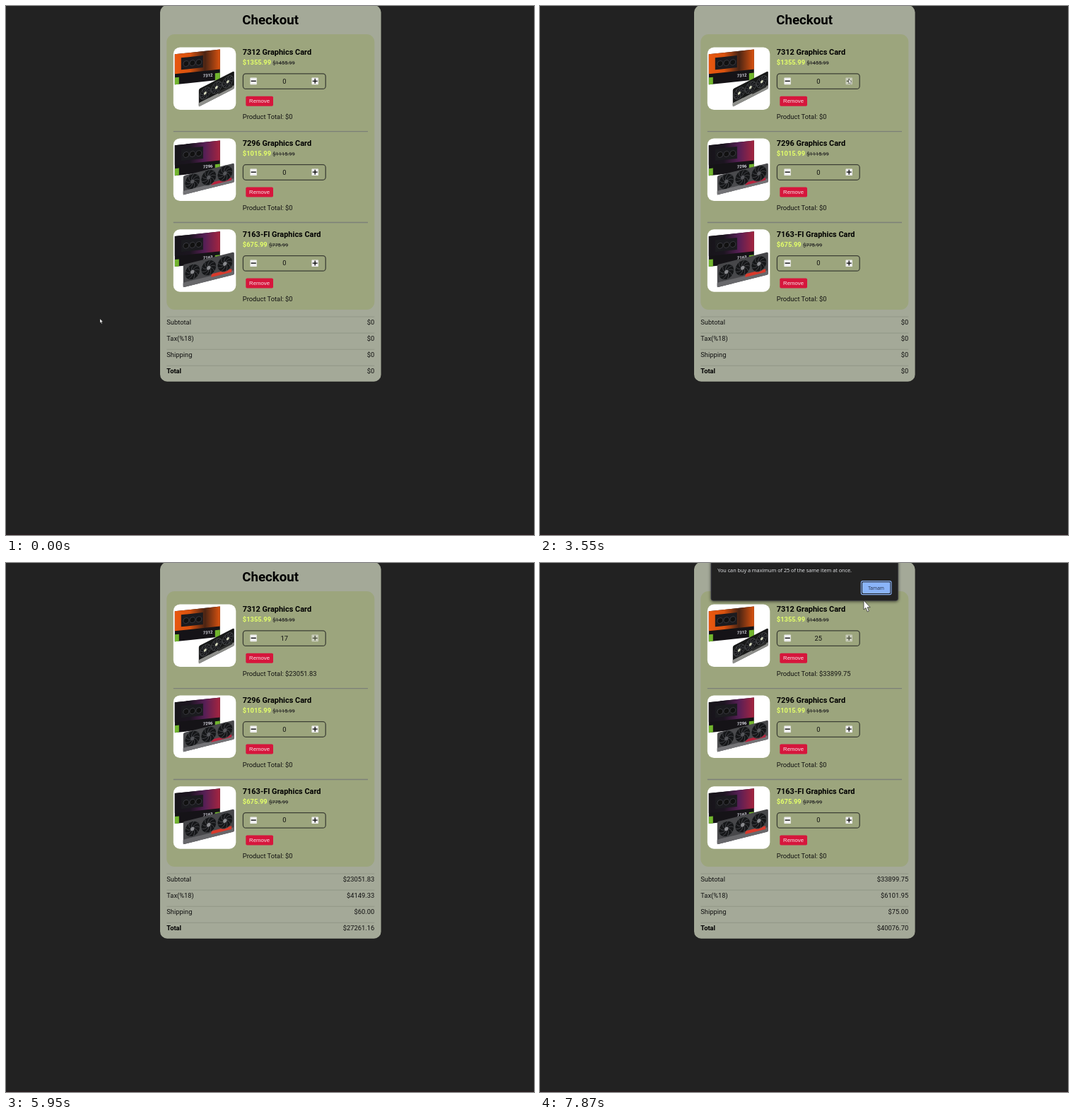
Write an HTML page that moves like this. It is 747 px wide and 749 px high and loops after 8000 ms.

```html
<!DOCTYPE html>
<html lang="en">
<head>
<meta charset="utf-8">
<title>Checkout</title>
<style>
html, body { margin: 0; width: 100%; height: 100%; overflow: hidden; background: #222; }
svg { display: block; width: 100%; height: 100%; }
text { font: 9.35px Roboto, sans-serif; fill: #111; }
.b { font-weight: 700; fill: #000; }
.h1 { font-size: 18.7px; }
.h3 { font-size: 10.95px; }
.price { fill: #e3ff69; }
.old { font-size: 7.48px; fill: #222; text-decoration: line-through; }
.mid { text-anchor: middle; }
.end { text-anchor: end; }
.btn { font: 7.8px "Liberation Sans", Arial, sans-serif; fill: #f6e6ea; }
.label { font: 700 6px Roboto, sans-serif; fill: #d9d9e2; }
.msg { font: 7.27px "Open Sans", sans-serif; fill: #e8eaed; }
.ok { font: 6.6px "Open Sans", sans-serif; fill: #202b44; }
</style>
</head>
<body>
<svg id="stage" viewBox="0 0 747 749"></svg>
<script>
const stage = document.getElementById('stage');
const loop = 8000;
const left = 227.3, right = 521.3, textX = 334.8;

const rect = (x, y, w, h, r, fill, more = '') =>
  `<rect x="${x}" y="${y}" width="${w}" height="${h}" rx="${r}" fill="${fill}" ${more}/>`;
const text = (x, y, s, cls = '', more = '') =>
  `<text x="${x}" y="${y}" class="${cls}" ${more}>${s}</text>`;
const line = (x1, x2, y, color, w) =>
  `<path d="M${x1} ${y}H${x2}" stroke="${color}" stroke-width="${w}"/>`;
const group = (transform, body) => `<g transform="${transform}">${body}</g>`;
const times = (n, f) => Array.from({ length: n }, (_, i) => f(i)).join('');

const fan = (x, y, r, hub) => group(`translate(${x} ${y})`,
  `<circle r="${r}" fill="#151618" stroke="#4b4d50" stroke-width=".8"/>` +
  times(9, i => `<path d="M0 0Q${r * .6} 0 ${r * .7} ${r * .6}" fill="none" stroke="#505156" ` +
    `stroke-width=".7" transform="rotate(${i * 40})"/>`) +
  `<circle r="${r * .25}" fill="${hub}"/>`);

// Retail box behind a three-fan card; both are slanted rectangles
function photo({ label, glow, card, edge, accent, hub, x, y, w, h, tilt }) {
  const r = w / 6.6;
  const box = rect(2, 10, 64, 43, 0, '#151317') +
    rect(2, 10, 64, 28, 0, `url(#${glow})`) +
    rect(11, 16, 31, 17, 0, '#1b1b1f') +
    times(3, i => `<circle cx="${18 + i * 9}" cy="25" r="4" fill="#111" stroke="#46474d" stroke-width=".7"/>`) +
    text(42, 47, label, 'label') +
    rect(2, 43, 6, 10, 0, '#72b52e') + rect(59, 43, 7, 10, 0, '#72b52e');
  const body = rect(0, 0, w, h, 2, card) + rect(0, h * .8, w, h * .2, 1, edge) +
    rect(w * .55, h * .72, w * .4, h * .14, 0, accent) +
    times(3, i => fan(w * (.18 + i * .32), h * .42, r, hub)) +
    rect(0, h * .8, w * .3, h * .2, 0, edge);
  return rect(0, 0, 88.5, 88.5, 9.3, '#fff') +
    group('skewY(-6)', box) + group(`translate(${x} ${y}) skewY(${-tilt})`, body);
}

const slim = { glow: 'purple', x: 14, w: 72, tilt: 14 };
const items = [
  { name: '7312 Graphics Card', price: 1355.99, look: { label: '7312', glow: 'orange', card: '#171818',
    edge: '#8f908c', accent: '#2c2d2c', hub: '#d5d9bd', x: 36, y: 59, w: 50, h: 25, tilt: 27 } },
  { name: '7296 Graphics Card', price: 1015.99, look: { ...slim, label: '7296', card: '#4a4a4d',
    edge: '#747477', accent: '#b8223c', hub: '#55565a', y: 53, h: 27 } },
  { name: '7163-FI Graphics Card', price: 675.99, look: { ...slim, label: '7163', card: '#47474a',
    edge: '#68686b', accent: '#d93a2c', hub: '#8b8c90', y: 50, h: 32 } }
];

const sign = d => `<path d="${d}" stroke="#000" stroke-width="1.3"/>`;
const product = ({ name, price, look }, i) => group(`translate(0 ${i * 128.9})`,
  group('translate(236.8 58.5)', photo(look)) +
  text(textX, 69.3, name, 'b h3') +
  `<text x="${textX}" y="83.2" class="b price">$${price}<tspan class="old" dx="2.3" ` +
    `font-weight="400" style="font-weight:400">$${(price + 100).toFixed(2)}</tspan></text>` +
  rect(335.4, 95.8, 116.8, 21.6, 4, 'none', 'stroke="#3c3f35" stroke-width="1.3"') +
  rect(345.4, 101.6, 9.4, 9.6, .6, '#efefef') + sign('M346.6 106.3h7.2') +
  `<g id="plus${i}">${rect(432.5, 101.6, 9.4, 9.6, .6, '#efefef')}${sign('M433.7 106.3h7m-3.5 -3.5v7')}</g>` +
  text(393.8, 109.7, '0', 'mid', `id="qty${i}"`) +
  rect(339.3, 127.7, 38.7, 14, 1.8, '#d6163c') + text(358.6, 137.4, 'Remove', 'btn mid') +
  text(textX, 160.4, 'Product Total: $0', '', `id="sum${i}"`) +
  (i < 2 ? line(236.8, 512, 177.6, '#7c8078', 1.3) : ''));

const summary = ['Subtotal', 'Tax(%18)', 'Shipping', 'Total'].map((name, i) =>
  group(`translate(0 ${440 + i * 23.1})`,
    line(left, right, 0, '#8d9283', .8) +
    text(left, 10.9, name, i === 3 ? 'b' : '') +
    text(right, 10.9, '$0', 'end', `id="row${i}"`))).join('');

const gradient = (id, ...colors) =>
  `<linearGradient id="${id}" x1="0" y1="0" x2="1" y2="0">${colors.map((c, i) =>
    `<stop offset="${i / (colors.length - 1)}" stop-color="${c}"/>`).join('')}</linearGradient>`;

stage.innerHTML = `<defs>
    ${gradient('purple', '#17151a', '#1c1520', '#571f56', '#a5243f')}
    ${gradient('orange', '#e8580f', '#d9520f', '#4a2414', '#d9520f')}
    <filter id="shade" x="-10%" y="-30%" width="120%" height="160%">
      <feDropShadow dx="0" dy="1" stdDeviation="2" flood-opacity=".6"/></filter>
  </defs>
  ${rect(0, 0, 747, 749, 0, '#222')}${rect(0, 748, 747, 1, 0, '#2b1c1f')}
  ${rect(218, -1, 312.6, 532.7, 10, '#a4a998')}
  ${text(374.2, 25.5, 'Checkout', 'b h1 mid')}
  ${rect(left, 40, right - left, 390, 11, '#9ca57d')}
  ${items.map(product).join('')}${summary}
  <g id="dialog">
    ${rect(242, -20, 264.5, 73.3, 3, '#202124', 'stroke="#3f4145" stroke-width=".8" filter="url(#shade)"')}
    ${text(251.2, 13, 'You can buy a maximum of 25 of the same item at once.', 'msg')}
    ${rect(454.4, 25.6, 42.6, 19, 2.2, '#202124', 'stroke="#8ab4f8" stroke-width="1.1"')}
    ${rect(456, 27.2, 39.4, 15.8, 1.4, '#8ab4f8')}${text(475.6, 37.6, 'Tamam', 'ok mid')}
  </g>
  <path id="cursor" d="M0 0V13L3 10.5L5.2 16L7.4 15L5.1 9.8H9.2Z" fill="#fff" stroke="#333" stroke-width=".8"/>`;

const el = id => document.getElementById(id);
const put = (id, s) => { if (el(id).textContent !== s) el(id).textContent = s; };
const money = v => '$' + (v ? (v - 1e-6).toFixed(2) : '0');
const clamp = (v, lo, hi) => Math.max(lo, Math.min(hi, v));
const mix = (a, b, f) => a.map((v, i) => v + (b[i] - v) * f);

const plus = [437, 104], minus = [354.5, 103.5];
// Pointer moves: start, end, from, to; hidden in between
const moves = [
  [0, 160, [133, 443], [133, 443]],
  [160, 320, [156, 222], [156, 222]],
  [820, 1460, [196, 282], [458, 116]],
  [1460, 1940, [458, 116], plus],
  [1940, 2260, plus, minus],
  [2260, 2910, minus, [347, 103]],
  [2910, 3390, [347, 103], plus],
  [3390, 3600, plus, plus],
  [7230, 7870, [437, 96], [458, 53]],
  [7870, loop, [458, 53], [458, 53]]
];

function pointer(t) {
  const move = moves.find(([start, end]) => t >= start && t < end);
  if (!move) return null;
  const [start, end, from, to] = move;
  return mix(from, to, (t - start) / (end - start));
}

function draw(t) {
  const n = clamp(Math.floor((t - 3520) / 140.5), 0, 25);
  const sub = n * items[0].price, tax = sub * .18, ship = 15 * Math.ceil(n / 5);
  put('qty0', String(n));
  put('sum0', 'Product Total: ' + money(sub));
  [sub, tax, ship, sub + tax + ship].forEach((v, i) => put('row' + i, money(v)));

  el('plus0').setAttribute('opacity', t >= 3350 ? .55 : 1);
  el('dialog').setAttribute('opacity', clamp((t - 7150) / 160, 0, 1));

  const p = pointer(t);
  el('cursor').setAttribute('visibility', p ? 'visible' : 'hidden');
  if (p) el('cursor').setAttribute('transform', `translate(${p}) scale(${t < 7230 ? .42 : 1})`);
}

const start = performance.now();
function tick(now) {
  draw(Math.max(0, now - start) % loop);
  requestAnimationFrame(tick);
}
draw(0);
requestAnimationFrame(tick);
</script>
</body>
</html>
```
